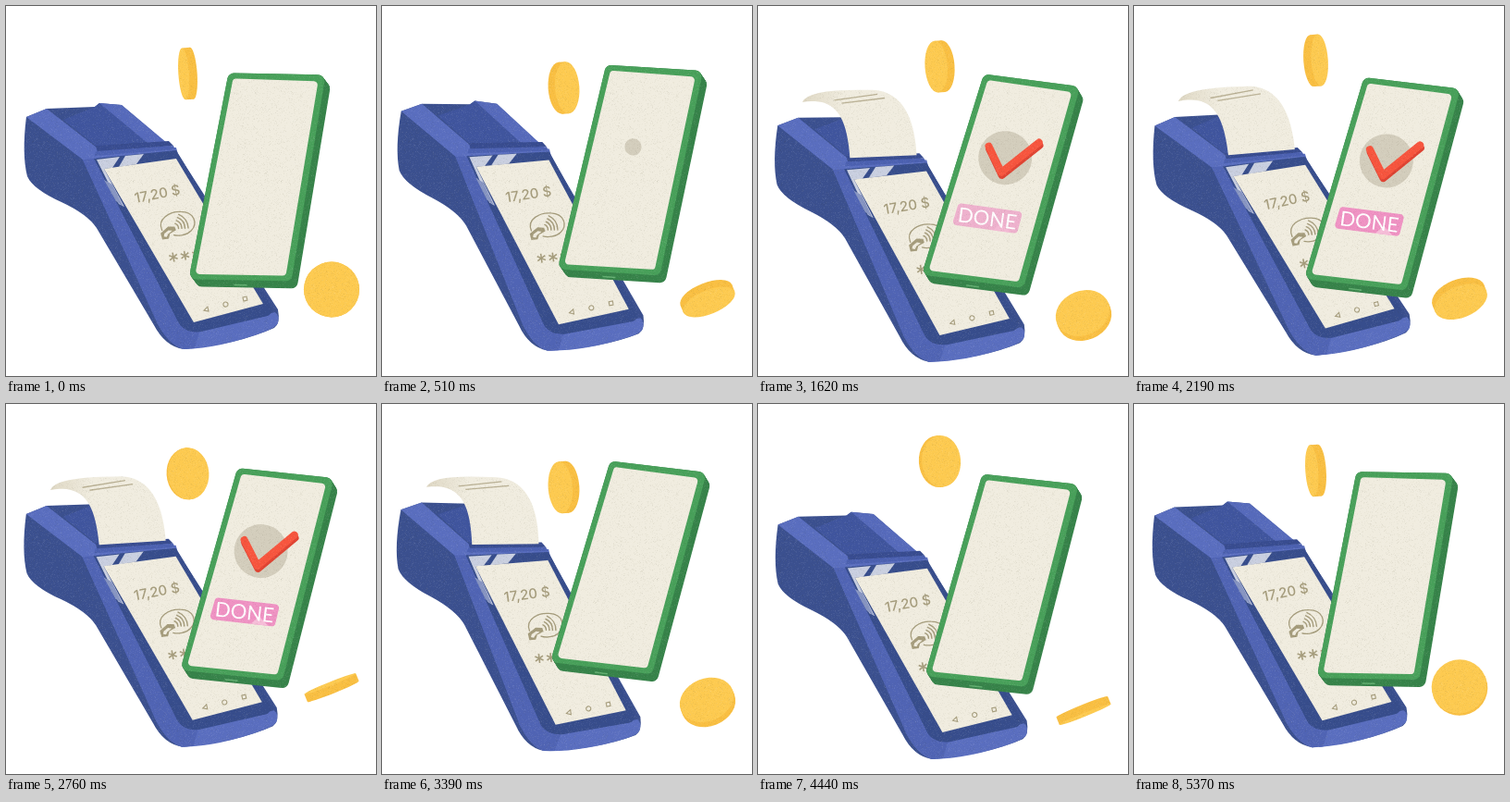
Write an HTML page with a canvas that moves like this. It is 400 by 400 pixels and loops after 5.4 s.

```html
<!DOCTYPE html>
<html lang="en">
<head>
<meta charset="utf-8">
<title>Contactless payment</title>
<style>
html, body { margin: 0; width: 100%; height: 100%; overflow: hidden; background: #fff; }
canvas { display: block; width: 100vmin; height: 100vmin; }
</style>
</head>
<body>
<canvas id="stage" width="400" height="400"></canvas>
<script>
const ctx = document.getElementById('stage').getContext('2d');
const LOOP = 5400, STEP = 30, SWAY = LOOP / 2, FLIP = LOOP / 3, RAD = Math.PI / 180;
const PAPER = '#f0ecdf', INK = '#a59c7c';

const clamp = v => Math.max(0, Math.min(1, v));
const ramp = (t, a, b) => clamp((t - a) / (b - a));
const ease = v => v * v * (3 - 2 * v);
const wave = (t, peak) => Math.cos(2 * Math.PI * (t - peak) / SWAY);

function keyed(t, keys) {
  let i = 0;
  while (i < keys.length - 2 && t >= keys[i + 1][0]) i++;
  const [a, b] = [keys[i], keys[i + 1]];
  return a[1] + (b[1] - a[1]) * ease(ramp(t, a[0], b[0]));
}

function fill(path, color) {
  ctx.fillStyle = color;
  ctx.fill(new Path2D(path));
}

function stroke(path, color, width) {
  ctx.strokeStyle = color;
  ctx.lineWidth = width;
  ctx.stroke(new Path2D(path));
}

// Polygon with rounded corners
function rounded(pts, r) {
  const n = pts.length, p = new Path2D();
  const mid = (a, b) => [(a[0] + b[0]) / 2, (a[1] + b[1]) / 2];
  p.moveTo(...mid(pts[n - 1], pts[0]));
  pts.forEach((a, i) => p.arcTo(...a, ...mid(a, pts[(i + 1) % n]), r));
  p.closePath();
  return p;
}

function fillRounded(pts, r, color) {
  ctx.fillStyle = color;
  ctx.fill(rounded(pts, r));
}

function makeGrain() {
  const tile = document.createElement('canvas');
  tile.width = tile.height = 160;
  const g = tile.getContext('2d');
  let seed = 7;
  const rnd = () => (seed = seed * 16807 % 2147483647) / 2147483647;
  for (let i = 0; i < 9000; i++) {
    g.fillStyle = rnd() < 0.5 ? 'rgba(255,255,255,.05)' : 'rgba(60,50,30,.04)';
    g.fillRect(rnd() * 160 | 0, rnd() * 160 | 0, 1, 1);
  }
  return ctx.createPattern(tile, 'repeat');
}
const grain = makeGrain();

// open: 0 seen on edge, 1 facing the viewer; side: where the face sits
function coin(x, y, rx, ry, tilt, open, side) {
  const w = Math.max(0.5, open * rx);
  const off = 4.5 * Math.sqrt(1 - open * open) * side;
  ctx.save();
  ctx.translate(x, y);
  ctx.rotate(tilt * RAD);
  const disc = (dx, color) => {
    ctx.fillStyle = color;
    ctx.beginPath();
    ctx.ellipse(dx, 0, w, ry, 0, 0, 2 * Math.PI);
    ctx.fill();
  };
  disc(-off, '#f9bf42');
  ctx.fillRect(-Math.abs(off), -ry, 2 * Math.abs(off), 2 * ry);
  disc(off, '#fdca50');
  ctx.restore();
}

function coins(t) {
  const spin = (t / 10 - 15) * RAD;
  const s = Math.sin(spin);
  coin(196.5, 74 + 16 * wave(t, 700), 22.5, 28, -4, Math.abs(s), Math.sign(Math.cos(spin) * s) || 1);
  const flip = 1 - 2 * (t % FLIP) / FLIP;
  coin(352, 322 + 15.5 * wave(t, 1350), 30, 30, 68, Math.abs(flip), flip < 0 ? -1 : 1);
}

function bezier(p, s) {
  const q = 1 - s, k = [q * q * q, 3 * q * q * s, 3 * q * s * s, s * s * s];
  return [0, 1].map(d => p.reduce((sum, pt, i) => sum + k[i] * pt[d], 0));
}
const paperLeft = [[101, 153], [97, 115], [88, 86], [48, 94]];
const paperRight = [[173, 148], [170, 112], [158, 76], [118, 79]];

function receipt(p) {
  if (p <= 0) return;
  const N = 24, L = [], R = [];
  for (let i = 0; i <= N; i++) {
    L.push(bezier(paperLeft, p * i / N));
    R.push(bezier(paperRight, p * i / N));
  }
  const end = L[N], far = R[N], curl = ramp(p, 0.6, 1);
  ctx.beginPath();
  L.forEach(pt => ctx.lineTo(...pt));
  ctx.quadraticCurveTo((end[0] + far[0]) / 2 - 30 * curl, (end[1] + far[1]) / 2 - 7 * curl, ...far);
  R.reverse().forEach(pt => ctx.lineTo(...pt));
  ctx.closePath();
  const tone = ctx.createLinearGradient(48, 0, 92, 0);
  tone.addColorStop(0, '#ded7c3');
  tone.addColorStop(1, PAPER);
  ctx.fillStyle = tone;
  ctx.fill();

  ctx.strokeStyle = '#b9b094';
  ctx.lineWidth = 1.3;
  for (const s of [p * 0.86 - 0.06, p * 0.8 - 0.1]) {
    if (s < 0.02) continue;
    const a = bezier(paperLeft, s), b = bezier(paperRight, s);
    const at = f => [a[0] + (b[0] - a[0]) * f, a[1] + (b[1] - a[1]) * f];
    ctx.beginPath();
    ctx.moveTo(...at(0.2));
    ctx.lineTo(...at(0.86));
    ctx.stroke();
  }
}

function display() {
  fill('M106 176L184 165L278 322L203 342Z', PAPER);

  ctx.save();
  ctx.translate(140, 213);
  ctx.rotate(-11 * RAD);
  ctx.fillStyle = INK;
  ctx.font = '500 15px Inter, sans-serif';
  ctx.fillText('17,20 $', 0, 0);
  ctx.restore();

  ctx.save();
  ctx.translate(185, 236);
  ctx.rotate(-8 * RAD);
  ctx.lineCap = 'round';
  stroke('M-17 4C-21 -9 -6 -15 6 -13C20 -11 23 2 14 9C9 13 0 13 -5 11', INK, 1.3);
  for (let i = 0; i < 4; i++) {
    ctx.lineWidth = 1.5;
    ctx.beginPath();
    ctx.arc(-5, 4, 6 + i * 3.5, -1.05, 0.1);
    ctx.stroke();
  }
  fill('M-19 7L-10 1L-3 2L-2 6L-9 9L-11 14L-18 14Z', INK);
  fill('M-15 8L-10 5L-6 6L-11 9L-13 12L-16 11Z', PAPER);
  ctx.restore();

  for (let i = 0; i < 4; i++) {
    const x = 181 + i * 12.5, y = 271.5 - i * 1.8;
    for (let k = 0; k < 3; k++) {
      const a = (80 + k * 60) * RAD, dx = 5 * Math.cos(a), dy = 5 * Math.sin(a);
      stroke(`M${x - dx} ${y - dy}L${x + dx} ${y + dy}`, INK, 1.6);
    }
  }
  stroke('M214 329L218 325L219 330Z', INK, 1.1);
  stroke('M235 323a2.5 2.5 0 1 0 5 -1a2.5 2.5 0 1 0 -5 1', INK, 1.1);
  stroke('M256 315L260 314L261 318L257 319Z', INK, 1.1);
}

function terminal(t) {
  const turn = wave(t, 950);
  ctx.save();
  ctx.translate(112.5 - 3.6 - 5.95 * turn, 231.5 + 4.7 - 7.1 * wave(t, 370));
  ctx.rotate((1.46 + 2.44 * turn) * RAD);
  ctx.translate(-112.5, -231.5);

  // body side, then lit faces
  fill('M22 120Q17 160 23 184Q29 198 60 212Q88 225 98 240L160 345Q172 368 192 371Q250 366 290 348' +
       'Q297 343 294 328L184 157L125 107L101 105L96 109L44 111Z', '#3b508f');
  fill('M22 120L44 111L98 153L184 153L186 160L96 165L188 345Q196 354 209 352L291 331' +
       'Q296 334 294 343Q291 348 280 352Q232 370 192 371Q176 366 166 346L83 166Z', '#5a6ebf');
  fill('M83 166L96 165L188 345Q196 354 209 352L204 370L192 371Q176 366 164 344Z', '#5064b4');

  // printer lid and slot
  fill('M62 123L96 109L101 105L154 147L98 152Z', '#40559e');
  fill('M101 105L125 107L180 153L153 148Z', '#566abb');
  fill('M97 151L176 146L181 151L99 158Z', '#384c90');

  // bezel and glass
  fill('M95 165L184 156L284 320Q291 331 283 335L211 352Q196 354 187 343Z', '#374d8c');
  fill('M98 166L123 163L115 175L106 176L128 217L122 214Z', '#c9cfe0');
  fill('M129 162L149 160L141 171L122 174Z', '#c9cfe0');
  fill('M106 188L115 193L127 217L119 211Z', '#8795c2');
  display();

  receipt(ramp(t, 840, 1590) - ease(ramp(t, 3650, 4250)));
  fill('M97 157L181 151L183 155L96 162Z', '#4c61b1');
  ctx.restore();
}

function badge(t) {
  const gone = 1 - ease(ramp(t, 2950, 3200));
  const grow = ease(ramp(t, 420, 660)), draw = ease(ramp(t, 600, 860));
  const tag = ease(ramp(t, 1260, 1590));
  if (gone <= 0) return;
  ctx.save();
  ctx.globalAlpha = gone;
  ctx.fillStyle = '#d3cdbc';
  ctx.beginPath();
  ctx.arc(2, -25.5, 29 * grow, 0, 2 * Math.PI);
  ctx.fill();

  if (draw > 0) {
    ctx.save();
    ctx.lineCap = 'round';
    ctx.lineJoin = 'round';
    ctx.setLineDash([85 * draw, 200]);
    stroke('M-16 -33L0.5 -6.5L37.5 -43', '#e04433', 8);
    stroke('M-17 -36L-0.5 -9.5L36.5 -46', '#f7553e', 8);
    ctx.restore();
  }

  if (tag > 0) {
    ctx.save();
    ctx.globalAlpha *= 0.5 + 0.5 * ramp(t, 1500, 1900);
    ctx.translate(-10, 41.5);
    ctx.rotate(1.5 * RAD);
    ctx.beginPath();
    ctx.rect(-38, -16, 76 * tag, 32);
    ctx.clip();
    fillRounded([[-33, -12], [37, -12], [34, 12], [-37, 12]], 4, '#ef92c3');
    fill('M8 12L16 3L27 12Z', '#f6bdd8');
    ctx.globalAlpha = gone;
    ctx.fillStyle = '#fff';
    ctx.font = '400 22px Lato, sans-serif';
    ctx.textAlign = 'center';
    ctx.fillText('DONE', 0, 8);
    ctx.restore();
  }
  ctx.restore();
}

const face = [[-31, -113], [74, -111], [37, 112], [-74, 110]];
const glass = [[-26, -107], [66, -104], [31, 106], [-67, 104.5]];

function phone(t) {
  const turn = keyed(t, [[0, 0], [990, 4.7], [1620, 6.3], [2760, 4.9], [3390, 5.7], [4440, 5], [5340, 0], [5400, 0]]);
  ctx.save();
  ctx.translate(266.5 + 5 * wave(t, 0), 185 - 8 * wave(t, 700));
  ctx.rotate(turn * RAD);
  const shift = k => face.map(([x, y]) => [x + 6 * k, y + 8 * k]);
  for (let k = 1; k > 0; k -= 0.1) fillRounded(shift(k), 7, '#37834a');
  fillRounded(face, 7, '#48a05a');
  fillRounded(glass, 4, PAPER);
  stroke('M-25 116L-11 116.3', '#62ae70', 1.5);
  badge(t);
  ctx.restore();
}

function render(now) {
  const t = Math.floor(now % LOOP / STEP) * STEP;
  ctx.clearRect(0, 0, 400, 400);
  coins(t);
  terminal(t);
  phone(t);
  ctx.save();
  ctx.globalCompositeOperation = 'source-atop';
  ctx.fillStyle = grain;
  ctx.fillRect(0, 0, 400, 400);
  ctx.restore();
}

const start = performance.now();
function tick() {
  render(performance.now() - start);
  requestAnimationFrame(tick);
}
tick();
</script>
</body>
</html>
```
